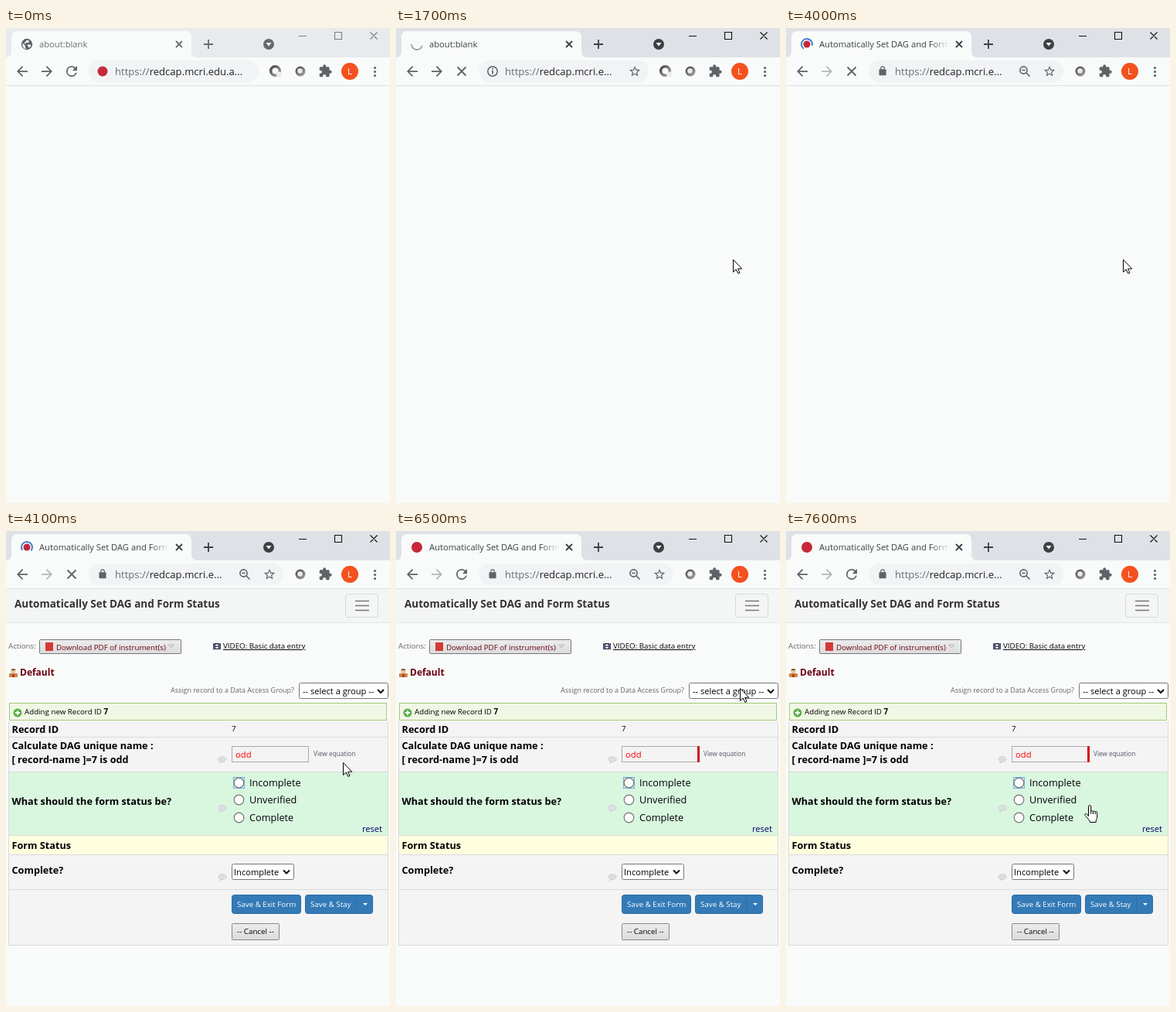
These frames come from a looping animation (497x614 px, 8 s). An HTML page:

```html
<!DOCTYPE html>
<html lang="en">
<head>
<meta charset="utf-8">
<title>Form status</title>
<style>
html, body { margin: 0; width: 100%; height: 100%; overflow: hidden; background: #f9fbfa; }
svg { display: block; width: 497px; height: 614px; }
text { font-family: "Open Sans", "Noto Sans", sans-serif; font-size: 9.75px; fill: #000; white-space: pre; }
.ui { font-size: 11.2px; fill: #3c4043; }
.url { font-size: 13.1px; fill: #202124; }
.b { font-size: 12.7px; font-weight: 700; }
.opt { font-size: 12.7px; }
.sel { font-size: 11.1px; }
.white { fill: #fff; }
.maroon { fill: #6b0010; }
.grey { fill: #666; }
.icon { fill: #5f6368; }
.line { fill: none; stroke: #5f6368; stroke-width: 1.8; }
.cursor { fill: #fff; stroke: #000; stroke-width: 1; stroke-linejoin: round; }
</style>
</head>
<body>
<svg viewBox="0 0 497 614">
  <defs>
    <linearGradient id="fade"><stop offset="0" stop-color="#f9fbfa" stop-opacity="0"/><stop offset="1" stop-color="#f9fbfa"/></linearGradient>
    <linearGradient id="btn" x2="0" y2="1"><stop offset="0" stop-color="#ececec"/><stop offset="1" stop-color="#dcdcdc"/></linearGradient>
    <linearGradient id="ball" x2="1" y2="1"><stop offset="0" stop-color="#444"/><stop offset="1" stop-color="#aaa"/></linearGradient>
    <path id="arrow" d="M20 11H7.83l5.59-5.59L12 4l-8 8 8 8 1.41-1.41L7.83 13H20z"/>
    <path id="star" d="M22 9.24l-7.19-.62L12 2 9.19 8.63 2 9.24l5.46 4.73L5.82 21 12 17.27 18.18 21l-1.63-7.03zM12 15.4l-3.76 2.27 1-4.28-3.32-2.88 4.38-.38L12 6.1l1.71 4.04 4.38.38-3.32 2.88 1 4.28z"/>
    <path id="chev" d="M-4-2L0 2 4-2" fill="none" stroke="#111" stroke-width="2"/>
    <g id="bubble"><ellipse cx="0" cy="-1" rx="5.3" ry="3.6" fill="#dcdfe0" stroke="#c9cdce" stroke-width=".7"/><path d="M-3 1.5L-4 5 0 2.4z" fill="#cfd3d4"/></g>
    <circle id="radio" r="6.3" fill="#fff" stroke="#767676" stroke-width="1.2"/>
  </defs>

  <rect width="497" height="614" fill="#f9fbfa"/>

  <!-- tab strip -->
  <rect width="497" height="38" fill="#dee1e6"/>
  <rect id="veil" width="497" height="38" fill="#e8eaee"/>
  <path d="M-1 38Q7 38 7 30V12Q7 4 15 4H232Q240 4 240 12V30Q240 38 248 38z" fill="#f9fbfa"/>
  <g id="globe"><circle cx="27" cy="21" r="7.2" fill="#5f6368"/><path d="M21.500 19.500l3.500 3.500v2.500l1.500 1.500C23 27 20.500 23.500 21.500 19.500zM27 15.500l3 1-1 2.500h-3l-1.500 1.500-1-1 1.500-1.500zM27.500 21.500h4l1 2-3 2z" fill="#f9fbfa"/></g>
  <path id="spin" fill="none" stroke-width="2"/>
  <circle id="fav" cx="27" cy="21" fill="#c6283a"/>
  <g id="live">
    <text id="title" class="ui" x="43" y="25"></text>
    <rect x="188" y="10" width="23" height="22" fill="url(#fade)"/>
    <rect x="211" y="10" width="26" height="22" fill="#f9fbfa"/>
    <path class="line" d="M220 17l8 8m0-8l-8 8" style="stroke:#3c4043"/>
    <path class="line" d="M256 21h12M262 15v12" style="stroke:#3c4043"/>
    <circle cx="340" cy="21" r="7" fill="#3c4043"/><path d="M336.500 19h7l-3.500 4.500z" fill="#fff"/>
  </g>
  <path id="win" d="M379 10.500h10M425.500 5.500h9v9h-9zM471.500 5.500l9 9m0-9l-9 9" fill="none" stroke="#111" stroke-width="1.1"/>
  <clipPath id="clip"><rect x="0" y="0" width="211" height="38"/></clipPath>

  <!-- toolbar -->
  <path d="M0 74.500H497" stroke="#dfe2e2"/>
  <use href="#arrow" class="icon" transform="translate(10.500 45.500) scale(.875)"/>
  <use id="fwd" href="#arrow" class="icon" transform="translate(63.500 45.500) scale(-.875 .875)"/>
  <path id="reload" class="icon" transform="translate(74.500 45.500) scale(.875)" d="M17.650 6.350A7.958 7.958 0 0 0 12 4a8 8 0 1 0 7.730 10h-2.080A6 6 0 1 1 12 6c1.660 0 3.140.69 4.220 1.780L13 11h7V4z"/>
  <path id="stop" class="line" d="M79.500 50.500l11 11m0-11l-11 11"/>
  <rect id="bar" x="107" y="42" height="28" rx="14" fill="#f1f3f4"/>
  <circle id="site" cx="125" cy="56" r="6.500" fill="#c6283a"/>
  <g id="info"><circle class="line" cx="125" cy="56" r="6.200" style="stroke-width:1.500"/><path class="line" d="M125 55v4.500M125 52v1.700"/></g>
  <path id="lock" class="icon" transform="translate(118.200 48.800) scale(.57)" d="M18 8h-1V6A5 5 0 0 0 7 6v2H6c-1.100 0-2 .9-2 2v10c0 1.100.9 2 2 2h12c1.100 0 2-.9 2-2V10c0-1.100-.9-2-2-2zM15.100 8H8.900V6a3.100 3.100 0 0 1 6.200 0z"/>
  <text class="url" x="141" y="61"><tspan fill="#6a6e73">https://</tspan><tspan id="host"></tspan></text>
  <use id="fav-star" href="#star" class="icon"/>
  <g id="zoom" class="line" style="stroke-width:1.600"><circle cx="307.500" cy="54.500" r="4.600"/><path d="M311 58l4.500 4.500M305.300 54.500h4.400"/></g>
  <g id="ext"><circle cx="348.500" cy="55.500" r="5.800" fill="none" stroke="url(#ball)" stroke-width="3.600"/><circle cx="353.500" cy="60" r="3.500" fill="#eceeee"/></g>
  <circle cx="381" cy="56" r="6.500" fill="url(#ball)"/><circle cx="380.500" cy="55.500" r="3.300" fill="#e9ebeb"/>
  <path class="icon" transform="translate(404.200 46.500) scale(.76)" d="M20.500 11H19V7c0-1.100-.9-2-2-2h-4V3.500a2.500 2.500 0 0 0-5 0V5H4c-1.100 0-2 .9-2 2v3.800h1.500a2.700 2.700 0 0 1 0 5.400H2V20c0 1.100.9 2 2 2h3.800v-1.500a2.700 2.700 0 0 1 5.400 0V22H17c1.100 0 2-.9 2-2v-4h1.500a2.500 2.500 0 0 0 0-5z"/>
  <circle cx="445" cy="56" r="11" fill="#f4511e"/><text class="white" x="445" y="60" text-anchor="middle" style="font-size:11.500px">L</text>
  <g class="icon"><circle cx="477.500" cy="51.500" r="1.600"/><circle cx="477.500" cy="56.500" r="1.600"/><circle cx="477.500" cy="61.500" r="1.600"/></g>

  <!-- page -->
  <g id="page">
    <rect y="75" width="497" height="43" fill="#f4f5f5"/><path d="M0 118.500H497" stroke="#e5e7e7"/>
    <text x="11" y="99" style="font-size:13.500px;font-weight:700;fill:#333">Automatically Set DAG and Form Status</text>
    <rect x="439.500" y="81.500" width="42" height="30" rx="3.500" fill="none" stroke="#d9dada"/>
    <path d="M452 90.500h18M452 96.500h18M452 102.500h18" stroke="#777" stroke-width="1.600"/>

    <text class="grey" x="3" y="152">Actions:</text>
    <rect x="43.500" y="140.500" width="183" height="18" rx="1" fill="url(#btn)" stroke="#777"/>
    <rect x="51" y="144" width="10" height="11" fill="#d33a36"/>
    <text class="maroon" x="65" y="154">Download PDF of instrument(s)</text>
    <path d="M210.500 147h7l-3.500 4z" fill="#ddd" stroke="#bbb"/>
    <rect x="268" y="145" width="10" height="8" fill="#26264a"/><path d="M271 146.500h4v2h-4zM271 149.700h4v2h-4z" fill="#fff"/><path d="M269.300 145v8M276.700 145v8" stroke="#fff" stroke-dasharray="1"/>
    <text x="281" y="152" text-decoration="underline" fill="#000040">VIDEO: Basic data entry</text>

    <rect x="4" y="184" width="11" height="5" rx="1" fill="#c98a3c"/><circle cx="9.500" cy="181.500" r="3" fill="#e8c19a"/><path d="M6 180q3.500-4 7 0z" fill="#6d4526"/><path d="M8 185h3v4H8z" fill="#b33"/>
    <text class="maroon" x="18" y="187" style="font-size:12px;font-weight:700">Default</text>
    <text class="grey" x="213" y="209" style="font-size:9px">Assign record to a Data Access Group?</text>
    <rect x="379.500" y="196.500" width="115" height="20" rx="2" fill="#fff" stroke="#777"/>
    <text class="sel" x="384" y="211">-- select a group --</text><use href="#chev" x="485" y="207"/>

    <rect x="4" y="246" width="490" height="290" fill="#f4f4f4"/>
    <rect x="4" y="312" width="490" height="81" fill="#d9f6df"/>
    <rect x="4" y="394" width="490" height="24" fill="#ffffdf"/>
    <path d="M4 266.500H494M4 311.500H494M4 393.500H494M4 418.500H494M4 463.500H494M4 535.500H494M3.500 246V536M494.500 246V536" stroke="#d9dbdb"/>
    <rect x="4.500" y="222.500" width="488" height="22" fill="#f0f7e4" stroke="#a3cb79"/>
    <circle cx="15" cy="235" r="5.500" fill="#5fae4b"/><path d="M12 235h6M15 232v6" stroke="#fff" stroke-width="1.800"/>
    <text x="24" y="237">Adding new Record ID <tspan font-weight="700">7</tspan></text>

    <text class="b" x="7.500" y="261">Record ID</text><text x="292" y="259">7</text>
    <text class="b" x="7.500" y="282">Calculate DAG unique name :</text>
    <text class="b" x="7.500" y="300">[ record-name ]=7 is odd</text>
    <use href="#bubble" x="280" y="296"/>
    <rect x="292.500" y="278.500" width="99" height="20" fill="#f3f3f3" stroke="#aaa"/>
    <text x="297" y="293" style="font-size:11.250px;fill:#f00">odd</text>
    <rect id="mark" x="390" y="278" width="3" height="21" fill="#d01016"/>
    <text x="398" y="291" style="font-size:8.250px;fill:#55556a">View equation</text>

    <text class="b" x="7.500" y="354">What should the form status be?</text>
    <use href="#bubble" x="280" y="359"/>
    <rect x="294.500" y="318.500" width="14" height="14" fill="#d3ebf5" stroke="#72aedb"/>
    <use href="#radio" x="301.500" y="325.500"/><text class="opt" x="315" y="330">Incomplete</text>
    <use href="#radio" x="301.500" y="347.500"/><text class="opt" x="315" y="352">Unverified</text>
    <use href="#radio" x="301.500" y="370.500"/><text class="opt" x="315" y="375">Complete</text>
    <text class="sel" x="461" y="389" style="fill:#000066">reset</text>

    <text class="b" x="7.500" y="411">Form Status</text>
    <text class="b" x="7.500" y="443">Complete?</text>
    <use href="#bubble" x="280" y="448"/>
    <rect x="292.500" y="430.500" width="80" height="20" rx="2" fill="#fff" stroke="#777"/>
    <text class="sel" x="295" y="445">Incomplete</text><use href="#chev" x="363" y="440.500"/>

    <g fill="#337ab7" stroke="#2e6da4"><rect x="292.500" y="470.500" width="89" height="24" rx="3"/><rect x="387.500" y="470.500" width="87" height="24" rx="3"/><path d="M453.500 471v23"/></g>
    <text class="white" x="299" y="486">Save &amp; Exit Form</text>
    <text class="white" x="394" y="486">Save &amp; Stay</text>
    <path d="M462 481h6l-3 3z" fill="#fff"/>
    <rect x="292.500" y="507.500" width="61" height="21" rx="1" fill="url(#btn)" stroke="#888"/>
    <text x="299" y="521">-- Cancel --</text>
  </g>

  <path id="pointer" class="cursor" d="M.5.5V16.500L4.200 13 6.800 18.400 9 17.400 6.500 12.200H11.700z"/>
  <g id="hand" class="cursor"><path d="M5.500 14.500V2.200a1.600 1.600 0 0 1 3.200 0V8.600a1.500 1.500 0 0 1 2.800.3 1.500 1.500 0 0 1 2.800.5 1.300 1.300 0 0 1 2.400 1V16c0 2-1.600 3-1.600 6.500H7.500C7.300 19.500 3.600 17 1 13.400c-.8-1.600 1.200-2.600 2.400-1.400z"/><path d="M8.700 8.600V12M11.500 9V12M14.300 9.500V12" fill="none"/></g>
</svg>
<script>
const LOOP = 8000, STEP = 100;
const FOCUS = 100, WAIT = 900, LOAD = 3700, SHOW = 4100, DONE = 4300;

// time, x, y of the cursor's hot spot
const track = [
  [WAIT, 436, 299], [4700, 436, 299], [4900, 425, 313], [5200, 413, 322],
  [5400, 413, 322], [5500, 435, 311], [5700, 445, 290], [6000, 449, 250],
  [6300, 448, 211], [6500, 445, 203], [6700, 410, 193], [6800, 381, 190],
  [7000, 440, 188], [7100, 471, 214], [7200, 464, 235], [7300, 440, 290],
  [7400, 405, 352], [7500, 393, 359], [7600, 393, 355]
];

const $ = id => document.getElementById(id);
const show = (id, on) => { $(id).style.display = on ? "" : "none"; };
const put = (id, text) => { if ($(id).textContent !== text) $(id).textContent = text; };
$("title").setAttribute("clip-path", "url(#clip)");

function place(t) {
  const i = track.findIndex(p => p[0] > t);
  if (i < 1) return track[i < 0 ? track.length - 1 : 0].slice(1);
  const [a, b] = [track[i - 1], track[i]];
  const k = (t - a[0]) / (b[0] - a[0]);
  return [1, 2].map(n => Math.round(a[n] + (b[n] - a[n]) * k));
}

function arc(mid, span) {
  const at = deg => {
    const r = deg * Math.PI / 180;
    return (27 + 7 * Math.cos(r)).toFixed(2) + " " + (21 + 7 * Math.sin(r)).toFixed(2);
  };
  return `M${at(mid - span / 2)}A7 7 0 ${span > 180 ? 1 : 0} 1 ${at(mid + span / 2)}`;
}

function render(time) {
  const t = Math.floor(time / STEP) * STEP;
  const active = t >= FOCUS, waiting = t >= WAIT && t < LOAD;
  const loaded = t >= LOAD, busy = t >= WAIT && t < DONE;
  const glow = Math.min(1, Math.max(0, (t - FOCUS + STEP) / 300));

  $("veil").style.opacity = 1 - glow;
  $("win").style.opacity = .5 + .5 * glow;
  $("live").style.opacity = .75 + .25 * glow;

  show("globe", t < WAIT);
  show("spin", busy);
  show("fav", loaded);
  $("fav").setAttribute("r", busy ? 4.5 : 7);
  if (busy) {
    $("spin").setAttribute("stroke", waiting ? "#a2a5a8" : "#3f7fd0");
    $("spin").setAttribute("d", waiting
      ? arc(97 - (t - 1700) * 360 / 1320, 165)
      : arc(250 + (t - 4000) * 360 / 1568, 250));
  }

  put("title", loaded ? "Automatically Set DAG and Form Status" : "about:blank");
  put("host", active ? "redcap.mcri.e..." : "redcap.mcri.edu.a...");
  show("site", !active);
  show("info", active && !loaded);
  show("lock", loaded);
  show("zoom", loaded);
  show("ext", !loaded);
  show("fav-star", active);
  $("fav-star").setAttribute("transform", `translate(${loaded ? 332.5 : 300.5} 47.5) scale(.71)`);
  $("bar").setAttribute("width", loaded ? 252 : 220);
  $("fwd").style.opacity = loaded ? .45 : 1;
  show("reload", !busy);
  show("stop", busy);
  show("page", t >= SHOW);
  show("mark", t >= DONE);

  const [x, y] = place(t);
  const link = t >= SHOW && y >= 311 && y < 393;
  show("pointer", t >= WAIT && !link);
  show("hand", link);
  $("pointer").setAttribute("transform", `translate(${x} ${y})`);
  $("hand").setAttribute("transform", `translate(${x - 7} ${y - 1})`);
}

const start = performance.now();
function tick() {
  render((performance.now() - start) % LOOP);
  requestAnimationFrame(tick);
}
tick();
</script>
</body>
</html>
```
